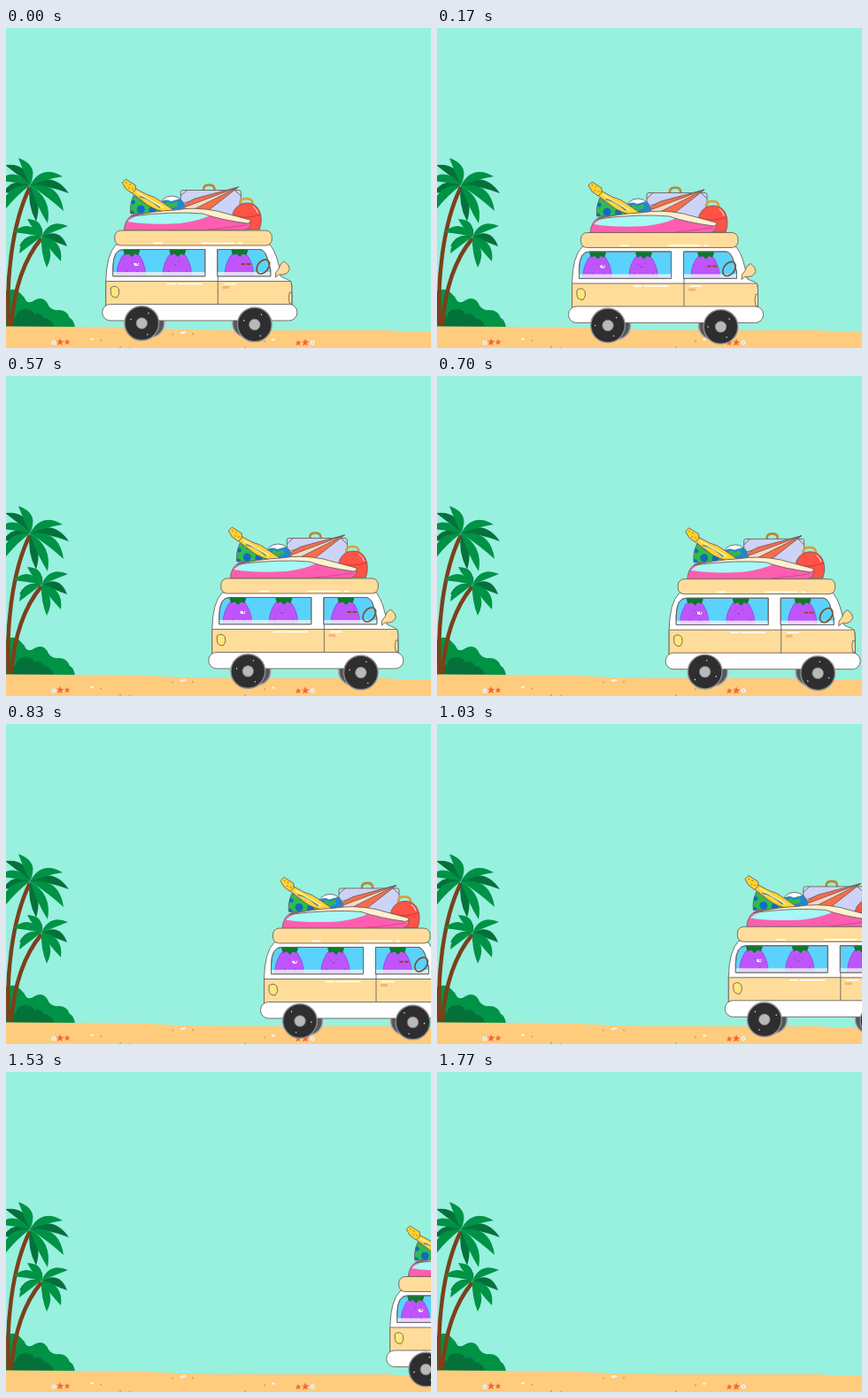
Animation of 480 by 362 pixels, one loop 1.81 s. Source, as an HTML page:

```html
<!DOCTYPE html>
<html lang="en">
<head>
<meta charset="utf-8">
<title>Beach van</title>
<style>
  html, body { margin: 0; height: 100%; overflow: hidden; background: #98f0df; }
  svg { display: block; width: 480px; height: 362px; }
  .line { stroke: #6b615c; stroke-width: .9; stroke-linejoin: round; }
  .bare { stroke: none; }
  .open { fill: none; stroke-linecap: round; }
</style>
</head>
<body>
<svg viewBox="0 0 480 362">
  <defs>
    <clipPath id="glass">
      <path id="panes" d="M133 250.500H225.500V280.800H121.500V270Q122 250.500 133 250.500ZM239.500 250.500H287Q292 250.500 295 258L299.500 273V280.800H239.500Z"/>
    </clipPath>
    <clipPath id="ball"><circle cx="188" cy="205" r="15"/></clipPath>
    <clipPath id="uke"><path id="ukeBody" d="M145 189Q140 200 141.500 210H178Q172 203 162 200Q152 196 145 189Z"/></clipPath>
    <g id="plant">
      <path d="M0 253C-6 253-9 256-11 260C-14 265-16 272-16 277V286H16V277C16 272 14 265 11 260C9 256 6 253 0 253Z" fill="#be55fb" stroke="#8f3ccd" stroke-width=".7"/>
      <path d="M-9 252Q-6 247 0 248Q7 247 10 252L8 257L4 255.500L1 259L-3 255.500L-7 257Z" fill="#0d7a2c"/>
    </g>
    <g id="wheel">
      <circle r="19.300" fill="#2e2e30" stroke="#8d8d8d" stroke-width="1.400"/>
      <circle r="6.300" fill="#b9b9b9" stroke="#777" stroke-width=".8"/>
    </g>
    <g id="specks" fill="#fff">
      <circle cx="-12" cy="-5" r=".7"/><circle cx="8" cy="-11" r=".7"/><circle cx="6" cy="13" r=".7"/>
    </g>
    <path id="star" d="M0-4L1.300-1.300L4.400-1L2 1L2.600 4L0 2.400L-2.800 4L-2-.2L-4.400-1.500L-1.300-1.300Z" fill="#f36a3c"/>
    <g id="shell"><circle r="2.900" fill="#fff3de" stroke="#d9c9b8" stroke-width=".6"/><circle r="1" fill="#b9d3d2"/></g>
  </defs>

  <rect width="480" height="362" fill="#98f0df"/>
  <path d="M0 298Q9 293 15 299Q20 303 23 309Q27 312 32 308Q43 302 48 314Q52 320 59 319Q69 319 72 328Q77 330 78 340H0Z" fill="#009245"/>
  <path d="M4 340Q4 326 11 327Q13 318 22 318Q30 318 32 324Q39 321 43 328Q52 329 55 340Z" fill="#05713a"/>
  <path d="M0 337.500Q80 338 150 338.500C190 341 230 342 290 342H430Q455 344 480 344V362H0Z" fill="#ffcb7d"/>
  <g fill="#fff4df">
    <ellipse cx="97" cy="352" rx="2" ry="1.200"/><ellipse cx="200" cy="344.500" rx="3.500" ry="1.300" transform="rotate(-12 200 344.500)"/><ellipse cx="302" cy="352.500" rx="2" ry="1.200"/>
  </g>
  <g fill="#c79c72">
    <circle cx="107" cy="353.500" r="1"/><circle cx="188" cy="346.500" r="1"/><circle cx="211" cy="346" r="1"/><circle cx="292" cy="354.500" r="1"/>
    <circle cx="129" cy="361" r="1"/><circle cx="140" cy="362" r="1"/><circle cx="270" cy="361.500" r="1"/>
  </g>
  <use href="#shell" x="54" y="356"/><use href="#star" x="61" y="355"/><use href="#star" transform="translate(69 355) scale(.8)"/>
  <use href="#shell" x="346" y="356"/><use href="#star" x="338" y="355.500"/><use href="#star" transform="translate(330 356) scale(.8)"/>
  <g fill="none" stroke="#7c401b" stroke-width="4.500">
    <path d="M3 337C0 288 6 222 27 180"/><path d="M6 336C9 298 19 263 40 238"/>
  </g>
  <g id="palms"></g>

  <g id="van">
    <g id="load" class="line">
      <path d="M224 184V181Q225 177.500 230 177.500Q235 177.500 236 181V184" class="open" stroke="#b98635" stroke-width="2.600"/>
      <rect x="198" y="183.500" width="68" height="34" rx="2" fill="#ccd3f7"/>
      <path d="M198 190L205 183.500M259 183.500L266 190" class="open"/>
      <path d="M263 180L195 200Q197 208 210 211Z" fill="#f8d6c4"/>
      <path d="M263 180L214 193Q203 198 199 204Z" fill="#f96d4b"/>
      <path d="M263 180L205 209L222 212Z" fill="#f96d4b"/>
      <path d="M265 199V197Q266 193 272 193Q278 193 279 197V199" class="open" stroke="#d9a035" stroke-width="2.600"/>
      <path d="M259 228Q253 217 258 207Q263 198 273 198Q283 198 287 207Q291 217 287 228Z" fill="#ff5346"/>
      <path d="M257 212Q272 217 288 211" class="open" stroke="#c9362e"/>
      <path d="M280 202Q284 205 285 209" class="open" stroke="#fff"/>
      <g clip-path="url(#ball)" class="bare">
        <circle cx="188" cy="205" r="15" fill="#fff"/>
        <path d="M173 199Q180 192 187 196L201 192L204 216H173Z" fill="#2386d2"/>
        <path d="M179 200L184 196L187 199L194 196L195 201L187 204Z" fill="#39b54a"/>
      </g>
      <circle cx="188" cy="205" r="15" fill="none"/>
      <use href="#ukeBody" fill="#2ebd4c"/>
      <g clip-path="url(#uke)" fill="#1668c4" class="bare">
        <circle cx="144" cy="197" r="2.500"/><circle cx="153" cy="205" r="4.500"/><circle cx="166" cy="206" r="4"/><circle cx="143" cy="209" r="2.500"/>
      </g>
      <path d="M141 185L146 181L159 188Q168 190 177 197L190 206L184 209Q168 206 159 199Z" fill="#ffd338"/>
      <path d="M152 191Q162 192 174 203" class="open" stroke="#4b83b4" stroke-width="1.500"/>
      <path d="M149 186L178 203" class="open" stroke="#fff2a0" stroke-width="1.500"/>
      <path d="M132 175L136 171L147 178V183L143 187L136 182Z" fill="#ffd22f"/>
      <path d="M136 175h1M140 177h1M139 181h1M143 182h1" class="open" stroke="#a66917"/>
      <path d="M134 229Q135 215 145 211Q190 205 222 208Q260 211 277 220Q278 225 270 229Z" fill="#ff5eb0"/>
      <path d="M138 219Q147 209 180 207Q222 207 232 211Q224 217 197 221Q162 223 138 219Z" fill="#a5f8f4" class="bare"/>
      <path d="M142 213Q168 207 191 206Q214 202 239 207L276 217Q278 220 273 221Q243 217 223 210Q190 207 142 213Z" fill="#fff0ce"/>
      <path d="M229 228Q252 226 272 223" class="open" stroke="#c94790"/>
    </g>

    <g fill="#56575a" stroke="#a3a5a6" stroke-width="1.500">
      <circle cx="164" cy="334" r="15.500"/><circle cx="272" cy="334" r="15.500"/>
    </g>
    <g class="line">
      <path d="M125 245Q114 256 113.500 286V315H323.500V291Q323 285 316 283.500L311 281Q308 257 299 245Z" fill="#fff"/>
      <path d="M113.500 286.500H322.500L323.500 293V315H113.500Z" fill="#ffdc99"/>
      <use href="#panes" fill="#5bd2fb"/>
    </g>
    <g clip-path="url(#glass)">
      <use href="#plant" x="142"/><use href="#plant" x="194"/><use href="#plant" x="264"/>
      <g class="open" stroke="#83369f" stroke-width=".9">
        <path d="M142 265h.5M188 265h.5M196 264h.5M191 268q1 .8 2 0M137 275v3M149 275v3M184 275v3M205 275v3"/>
        <path d="M267 267h3M273 267h3" stroke="#a0401d" stroke-width="1.800"/>
      </g>
      <path d="M145 266h6l-1 3h-4z" fill="#fff"/><circle cx="149" cy="267" r=".8" fill="#452166"/>
      <path d="M120 276H300V281H120Z" fill="#eef5ff" opacity=".8"/>
    </g>
    <ellipse cx="291" cy="270" rx="6" ry="9" transform="rotate(38 291 270)" fill="none" stroke="#78502d" stroke-width="1.700"/>
    <g class="line">
      <use href="#panes" fill="none"/>
      <path d="M240 281V313" class="open"/>
      <rect x="123.500" y="229" width="177.500" height="17" rx="7" fill="#ffdc99"/>
      <path d="M305 282Q304 276 309 272Q310 266 315 264Q321 268 321 273Q318 280 309 279Z" fill="#ffdc99"/>
      <rect x="109.500" y="312.500" width="220" height="18.500" rx="9" fill="#fff"/>
      <path d="M119 294Q124 290 128 295Q130 301 126 305Q119 305 119 299Z" fill="#ffe77c"/>
      <path d="M323.500 299H321Q319 305 321 312H323.500Z" fill="#ffe4ae"/>
    </g>
    <path d="M168 243.500h9M222 243.500h36M263 243.500h4M183 289.500h9M195 289.500h27M247 289.500h13" class="open" stroke="#fff" stroke-width="1.500"/>
    <rect x="245" y="292" width="8" height="3" rx="1" fill="#f4b66e"/>
    <use href="#wheel" x="154" y="334"/><use href="#wheel" x="281.500" y="335.500"/>
    <use href="#specks" id="rear"/><use href="#specks" id="front"/>
  </g>
</svg>
<script>
const byId = id => document.getElementById(id);
const LIGHT = '#009245', DARK = '#05713a';

// A frond runs from the crown to its tip; bend lifts its middle upward.
function frond([x, y], [tx, ty, bend, width, color]) {
  const mx = (x + tx) / 2, my = (y + ty) / 2;
  const dx = tx - x, dy = ty - y, len = Math.hypot(dx, dy);
  const side = Math.sign(dx) || 1;
  const at = d => `${mx + side * dy / len * d} ${my - side * dx / len * d}`;
  return `<path fill="${color}" d="M${x} ${y}Q${at(bend + width)} ${tx} ${ty}Q${at(bend - width)} ${x} ${y}"/>`;
}
const palm = (crown, fronds) => fronds.map(f => frond(crown, f)).join('');

byId('palms').innerHTML =
  palm([27, 178], [
    [34, 219, 2, 9, DARK], [-4, 187, 6, 9, DARK], [71, 187, 13, 9, DARK], [-1, 155, 10, 9, DARK],
    [14, 147, 9, 10, LIGHT], [64, 168, 11, 9, LIGHT], [-10, 173, 11, 9, LIGHT],
    [-3, 208, 13, 10, LIGHT], [47, 221, 7, 10, LIGHT], [65, 207, 13, 11, LIGHT]]) +
  palm([40, 236], [
    [36, 221, 0, 6, DARK], [15, 247, 5, 7, DARK], [69, 247, 9, 9, DARK],
    [24, 216, 6, 9, LIGHT], [70, 224, 8, 8, LIGHT], [8, 231, 10, 9, LIGHT],
    [15, 255, 9, 9, LIGHT], [46, 271, 5, 9, LIGHT], [62, 264, 8, 10, LIGHT]]);

// Distance driven at each step, linear between the knots.
const drive = [[0, -.7], [5, 39], [16, 113.3], [17, 119.3], [25, 178], [31, 215.8],
  [32, 226.3], [40, 279], [48, 334], [53, 374], [54, 380]];
function distance(n) {
  const i = drive.findIndex(([k]) => k > n);
  const [a, p] = drive[i - 1], [b, q] = drive[i];
  return p + (q - p) * (n - a) / (b - a);
}

const LOOP = 1810, start = performance.now();
function draw(now) {
  const t = Math.max(0, now - start) % LOOP;
  const n = Math.min(53, Math.floor(t / 33.4 + .2));
  const x = distance(n);
  const bump = 1.25 * (1 - Math.cos(2 * Math.PI * n / 3.4));
  const turn = x / 19.5 * 180 / Math.PI;
  byId('van').setAttribute('transform', `translate(${x} ${bump})`);
  byId('load').setAttribute('transform', `translate(0 ${bump * .2})`);
  byId('rear').setAttribute('transform', `translate(154 334) rotate(${turn})`);
  byId('front').setAttribute('transform', `translate(281.5 335.5) rotate(${turn})`);
  requestAnimationFrame(draw);
}
draw(start);
</script>
</body>
</html>
```
